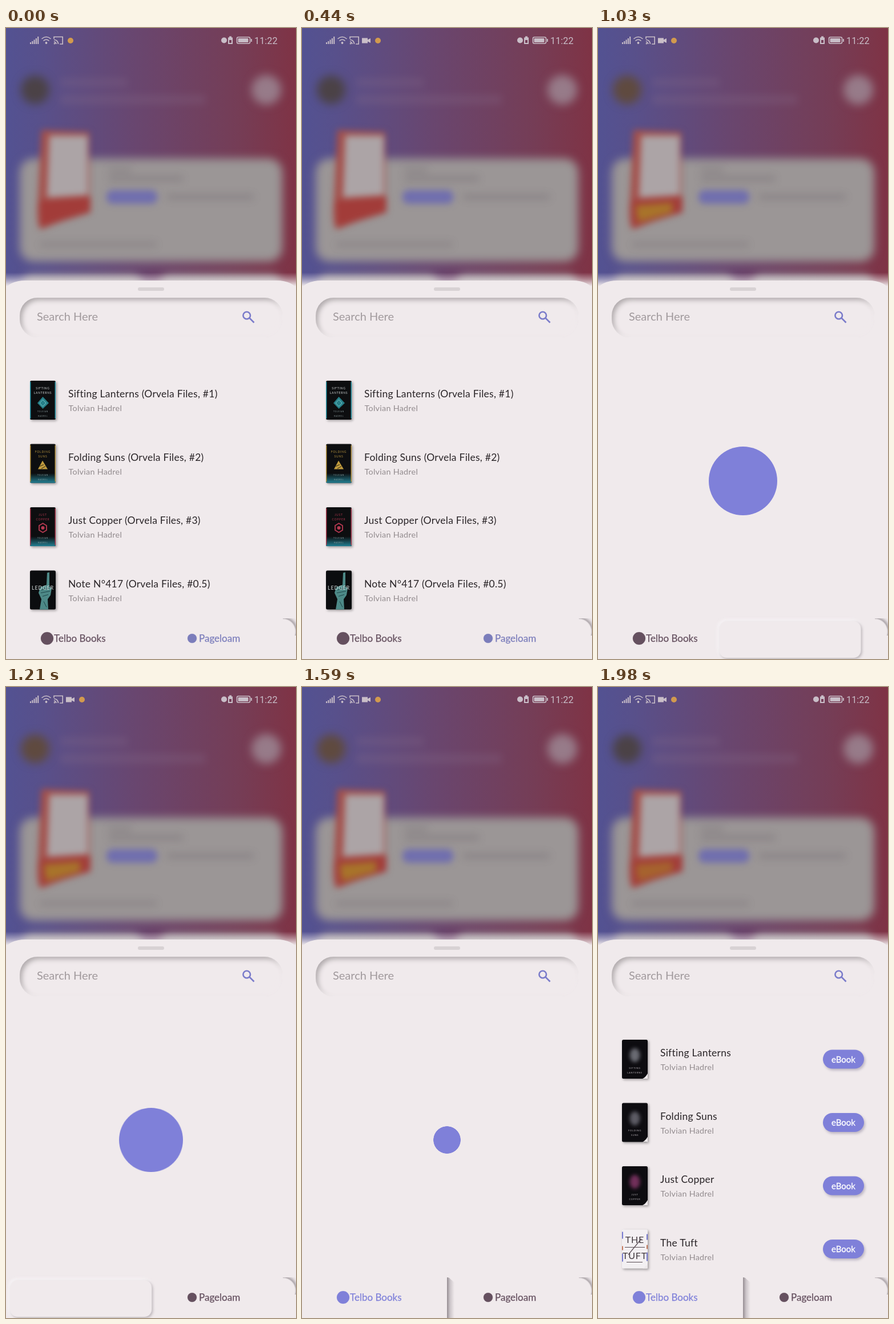
An HTML page that plays this animation: 508 by 1102 pixels, repeating every 3.26 s.

```html
<!DOCTYPE html>
<html lang="en">
<head>
<meta charset="utf-8">
<title>Book search</title>
<style>
:root { --paper: #f0eaec; --accent: #7f80d9; --ink: #65505f; --loop: 3260ms; }
html, body { margin: 0; width: 100%; height: 100%; overflow: hidden; background: var(--paper); }
body { position: relative; }
svg, .sheet, .handle, .search { position: absolute; }
svg { left: 0; top: 0; width: 508px; height: 1102px; }
text { font-family: Lato, "Open Sans", sans-serif; }

.sheet { left: 0; top: 441px; width: 508px; height: 661px; background: var(--paper);
  border-radius: 34px 34px 0 0 / 16px 16px 0 0; }
.handle { left: 231px; top: 12px; width: 46px; height: 6px; border-radius: 3px; background: #d8d2d4; }
.search { left: 24px; top: 30px; width: 460px; height: 69px; border-radius: 31px;
  box-shadow: inset -5px -5px 7px var(--paper), inset 4px 4px 8px #b0aaac; }

.soft { filter: blur(8px); }
.book { filter: blur(6px); }
.faint { filter: blur(7px); opacity: .25; }
.status { fill: #c9bec8; }
.line { fill: none; stroke: #c9bec8; stroke-width: 1.6; }
.clock { font: 16.3px Roboto, sans-serif; }

.title { font-size: 17.5px; letter-spacing: .25px; fill: #2a2528; }
.author { font-size: 14.3px; letter-spacing: .3px; fill: #928b8e; }
.badge { fill: var(--accent); filter: drop-shadow(2px 3px 2px rgba(70, 60, 100, .3)); }
.badge-text { font-size: 15px; fill: #fff; stroke: #fff; stroke-width: .35; text-anchor: middle; }
.cover { filter: drop-shadow(2px 2px 2px rgba(0, 0, 0, .35)); }
.cover text { text-anchor: middle; font-size: 5px; letter-spacing: .8px; }
.tab { font-size: 17px; stroke-width: .25; }
.pill { fill: var(--paper);
  filter: drop-shadow(2px 2px 2px rgba(60, 50, 60, .3)) drop-shadow(-2px -2px 3px rgba(250, 247, 250, .9)); }

/* Hard switches */
.series, .books, .loader, .glide, .groove, .amber, .tint,
.dark-cover, .face, .tab-left, .tab-right { animation: var(--loop) step-end infinite; }
.series { animation-name: series; }
.books { animation-name: books; }
.loader { animation-name: loader; }
.glide { animation-name: glide; }
.groove { animation-name: groove; }
.amber { animation-name: amber; }
.tint { animation-name: tint; }
.dark-cover { fill: #0d0c10; animation-name: warm-cover; }
.face { animation-name: warm-face; }
.tab-left { animation-name: tab-left; }
.tab-right { animation-name: tab-right; }
@keyframes series { 0% { opacity: 1 } 16.87%, 100% { opacity: 0 } }
@keyframes books { 0% { opacity: 0 } 54.29%, 100% { opacity: 1 } }
@keyframes loader { 0% { opacity: 0 } 16.87% { opacity: 1 } 54.29%, 100% { opacity: 0 } }
@keyframes glide { 0% { opacity: 0 } 16.87% { opacity: 1 } 39.4%, 100% { opacity: 0 } }
@keyframes groove { 0% { opacity: 0 } 39.4%, 100% { opacity: 1 } }
@keyframes amber { 0% { opacity: 0 } 16.87% { opacity: 1 } 54.29% { opacity: 0 } 60.73%, 100% { opacity: .7 } }
@keyframes tint { 0% { fill: #4b4246 } 16.87% { fill: #5f4a3f } 60.73%, 100% { fill: #4b4246 } }
@keyframes warm-cover { 0% { fill: #79551f } 60.73%, 100% { fill: #0d0c10 } }
@keyframes warm-face { 0% { fill: #69406c } 60.73%, 100% { fill: var(--tone) } }
@keyframes tab-left { 0% { fill: var(--ink); stroke: var(--ink) } 39.4%, 100% { fill: var(--accent); stroke: var(--accent) } }
@keyframes tab-right { 0% { fill: #7b7dbb; stroke: #7b7dbb } 16.87%, 100% { fill: var(--ink); stroke: var(--ink) } }

/* Continuous motion */
.camera { animation: camera var(--loop) infinite; }
.app { animation: app var(--loop) infinite; }
.shrink { transform-origin: 254px 791px; animation: shrink var(--loop) infinite; }
.pill { animation: slide var(--loop) infinite; }
@keyframes camera { 0%, 1.8% { opacity: 0 } 4.6%, 100% { opacity: 1 } }
@keyframes app { 0%, 1.8% { transform: none } 4.6%, 100% { transform: translateX(20px) } }
@keyframes shrink {
  0%, 31.6% { transform: scale(1); animation-timing-function: ease-in-out }
  62.3%, 100% { transform: scale(0) }
}
@keyframes slide {
  0%, 31.59% { transform: none; animation-timing-function: step-end }
  31.595% { transform: translateX(-44px); animation-timing-function: cubic-bezier(.2, .6, .3, 1) }
  39.4%, 100% { transform: translateX(-258px) }
}
</style>
</head>
<body>
<svg viewBox="0 0 508 1102">
  <defs>
    <linearGradient id="sky">
      <stop stop-color="#535292"/><stop offset=".12" stop-color="#58508b"/>
      <stop offset=".45" stop-color="#69466f"/><stop offset=".8" stop-color="#753d56"/>
      <stop offset="1" stop-color="#7f3345"/>
    </linearGradient>
    <linearGradient id="mist" x2="0" y2="1">
      <stop stop-color="#f0eaec" stop-opacity="0"/><stop offset=".5" stop-color="#f0eaec" stop-opacity=".45"/>
      <stop offset="1" stop-color="#f0eaec"/>
    </linearGradient>
  </defs>
  <rect width="508" height="480" fill="url(#sky)"/>
  <g class="soft">
    <circle class="tint" cx="51" cy="108" r="25"/>
    <circle cx="456" cy="108" r="26" fill="#977b89"/>
    <rect x="24" y="228" width="460" height="180" rx="24" fill="#9b9696"/>
    <rect x="28" y="431" width="210" height="50" rx="16" fill="#a59fa2"/>
    <rect x="270" y="431" width="212" height="50" rx="16" fill="#a59fa2"/>
  </g>
  <g class="book">
    <path d="M62 178L146 182V318L60 352Q52 340 56 300Z" fill="#a34f4a"/>
    <path d="M76 188H143V292L72 296Z" fill="#aca4a6"/>
    <path d="M58 302L148 294V322L62 348Z" fill="#a23c39"/>
    <path class="amber" d="M66 310L130 305V322L70 339Z" fill="#a8742a"/>
    <rect x="176" y="283" width="89" height="24" rx="10" fill="#706eae"/>
  </g>
  <g class="faint" fill="#8a6f8c">
    <rect x="95" y="88" width="118" height="14"/><rect x="95" y="117" width="255" height="16"/>
  </g>
  <g class="faint" fill="#5f5660">
    <rect x="180" y="244" width="40" height="8"/><rect x="180" y="258" width="130" height="10"/>
    <rect x="282" y="290" width="152" height="10"/><rect x="60" y="374" width="204" height="8"/>
  </g>
  <rect y="427" width="508" height="24" fill="url(#mist)"/>
  <rect y="451" width="508" height="20" fill="#f0eaec"/>

  <g class="status">
    <path d="M42 25h2v3h-2zM45.3 23h2v5h-2zM48.6 20.5h2v7.5h-2zM51.9 18h2v10h-2zM55.2 15h2v13h-2z"/>
    <circle cx="70.5" cy="26" r="1.9"/>
    <path class="line" d="M62.5 19q8-7 16 0M65.5 22.5q5-4.5 10 0"/>
    <path class="line" d="M84 19v-3.500h15.200v12.500h-5M84 20.500q7 .5 7.500 7.500M84 24q3.500.5 4 4"/>
    <circle cx="85" cy="27.300" r="1.200"/>
    <path class="camera" d="M105 17.500h10v3l5-2.500v8l-5-2.500v3h-10z"/>
    <circle class="app" cx="113" cy="22" r="5" fill="#d29a4e"/>
    <circle cx="382" cy="21.500" r="5"/>
    <path d="M389 16.500h2v-2h4v2h2v11.500h-8zM391 21v5h4v-5z" fill-rule="evenodd"/>
    <rect class="line" x="404.500" y="16" width="23" height="11" rx="2.500"/>
    <rect x="406.500" y="18" width="18" height="7" rx="1"/>
    <rect x="429" y="19" width="1.800" height="5"/>
    <text class="clock" x="435" y="27.500">11:22</text>
  </g>
</svg>

<div class="sheet"><div class="handle"></div><div class="search"></div></div>

<svg viewBox="0 0 508 1102">
  <defs>
    <linearGradient id="shade">
      <stop stop-color="#958d92"/><stop offset=".4" stop-color="#cbc4c8"/><stop offset="1" stop-color="#f0eaec"/>
    </linearGradient>
    <radialGradient id="corner" gradientUnits="userSpaceOnUse" cx="485" cy="1054" r="32">
      <stop offset=".66" stop-color="#b0a9ad" stop-opacity="0"/><stop offset=".73" stop-color="#b0a9ad"/>
      <stop offset=".88" stop-color="#e2dcdf"/><stop offset="1" stop-color="#f0eaec"/>
    </radialGradient>
    <linearGradient id="glow" x2="0" y2="1">
      <stop offset=".75" stop-color="#1f7f90" stop-opacity="0"/><stop offset="1" stop-color="#237f92"/>
    </linearGradient>
  </defs>
  <text x="54" y="511" font-size="20" fill="#a19a9d">Search Here</text>
  <g fill="none" stroke="#7a7bca" stroke-width="2.600">
    <circle cx="421.700" cy="502" r="6.300"/><path d="M426.500 506.500L434.500 514.500"/>
  </g>

  <g class="series" id="series"></g>
  <g class="books" id="books"></g>
  <g class="loader"><circle class="shrink" cx="254" cy="791" r="60" fill="#7f80d9"/></g>

  <path d="M485 1031h23v30h-23z" fill="url(#corner)"/>
  <path class="groove" d="M254 1031q4 0 6 3l7 6v62h-13z" fill="url(#shade)"/>
  <g class="tab tab-left"><circle cx="72" cy="1066" r="11"/><text x="84" y="1072">Telbo Books</text></g>
  <g class="tab tab-right"><circle cx="326" cy="1066" r="8"/><text x="338" y="1072">Pageloam</text></g>
  <g class="glide"><rect class="pill" x="259" y="1036" width="248" height="64" rx="13"/></g>
</svg>

<script>
const author = 'Tolvian Hadrel';

const label = (words, y, fill, size = 5) =>
  words.split(' ').map((word, i) =>
    `<text x="22.5" y="${y + i * 8}" fill="${fill}" style="font-size:${size}px">${word}</text>`).join('');

const board = (cls, fill) => `<rect class="${cls}" width="45" height="68" rx="2.5" fill="${fill}"/>`;
const curl = '<path d="M45 59V68H36Q41 66 45 59Z" fill="#eee9eb"/>';

function seriesCover(name, color, emblem, lit) {
  return board('', '#0d0e10')
    + (lit ? board('', 'url(#glow)') : '')
    + `<path d="M.7 2V66M44.300 2V66" stroke="${color}" stroke-width="1.400"/>`
    + label(name.toUpperCase(), 15, lit ? color : '#d8dcdc')
    + emblem
    + label('TOLVIAN HADREL', 55, '#8fa0a2', 3.2);
}

const handCover = board('', '#0b0d0f')
  + '<path d="M17 68L20 50L15 39L18 29L29 25L30 4L34 3V28L38 31L36 43L31 50L32 68Z" fill="#4d8987"/>'
  + '<path d="M20 34L33 30M19 39L35 36M22 45L32 42M24 54L29 64" stroke="#1c4548"/>'
  + label('LEDGER', 33, '#d5dddd', 9);

const faceCover = (name, y, tone) => board('dark-cover', '#0d0c10')
  + `<ellipse class="face" style="--tone:${tone};filter:blur(3px)" cx="22.500" cy="27" rx="9" ry="12"/>`
  + label(name.toUpperCase(), y, '#b9b2b8', 4) + curl;

const plainCover = board('', '#f3f0f2')
  + '<path d="M1 4V16M1 42V56M44 8V18M44 40V55" stroke="#777bd0" stroke-width="2"/>'
  + '<path d="M1 29V36M44 27V34" stroke="#c57a5c" stroke-width="2"/>'
  + label('THE', 23, '#41393f', 16) + label('TUFT', 51, '#41393f', 16)
  + '<path d="M5 31H40M34 16L11 44M8 57H36" stroke="#594d55" stroke-width="1.200"/>' + curl;

const badge = '<rect class="badge" x="394" y="17.500" width="72" height="33" rx="16.500"/>'
  + '<text class="badge-text" x="430" y="39.500">eBook</text>';

const row = ([title, cover], i, extra) => `<g transform="translate(0 ${616 + i * 110.5})">
  <g class="cover" transform="translate(42 0)">${cover}</g>
  <text class="title" x="109" y="29">${title}</text>
  <text class="author" x="109.500" y="53">${author}</text>${extra}</g>`;

const fill = (id, items, extra = '') =>
  document.getElementById(id).innerHTML = items.map((item, i) => row(item, i, extra)).join('');

const diamond = '<path d="M22.500 28L33 39L22.500 49L13 39Z" fill="#277f88"/>'
  + '<path d="M17 39L22.500 33L28 39L22.500 45Z" fill="none" stroke="#74c3c6"/>';
const triangle = '<path d="M22 29L31 44H14Z" fill="#c09b3e"/><path d="M17 39L24 36M20 43L27 39" stroke="#2a2415"/>';
const hexagon = '<path d="M22.500 28L29 32V40L22.500 44L16 40V32Z" fill="none" stroke="#b73a52" stroke-width="1.800"/>'
  + '<circle cx="22.500" cy="36" r="3" fill="#b73a52"/>';

fill('series', [
  ['Sifting Lanterns (Orvela Files, #1)', seriesCover('Sifting Lanterns', '#2699ab', diamond, false)],
  ['Folding Suns (Orvela Files, #2)', seriesCover('Folding Suns', '#b8953f', triangle, true)],
  ['Just Copper (Orvela Files, #3)', seriesCover('Just Copper', '#a8344a', hexagon, true)],
  ['Note N°417 (Orvela Files, #0.5)', handCover]
]);
fill('books', [
  ['Sifting Lanterns', faceCover('Sifting Lanterns', 51, '#696a72')],
  ['Folding Suns', faceCover('Folding Suns', 49, '#5c5b64')],
  ['Just Copper', faceCover('Just Copper', 51, '#712f5a')],
  ['The Tuft', plainCover]
], badge);
</script>
</body>
</html>
```
